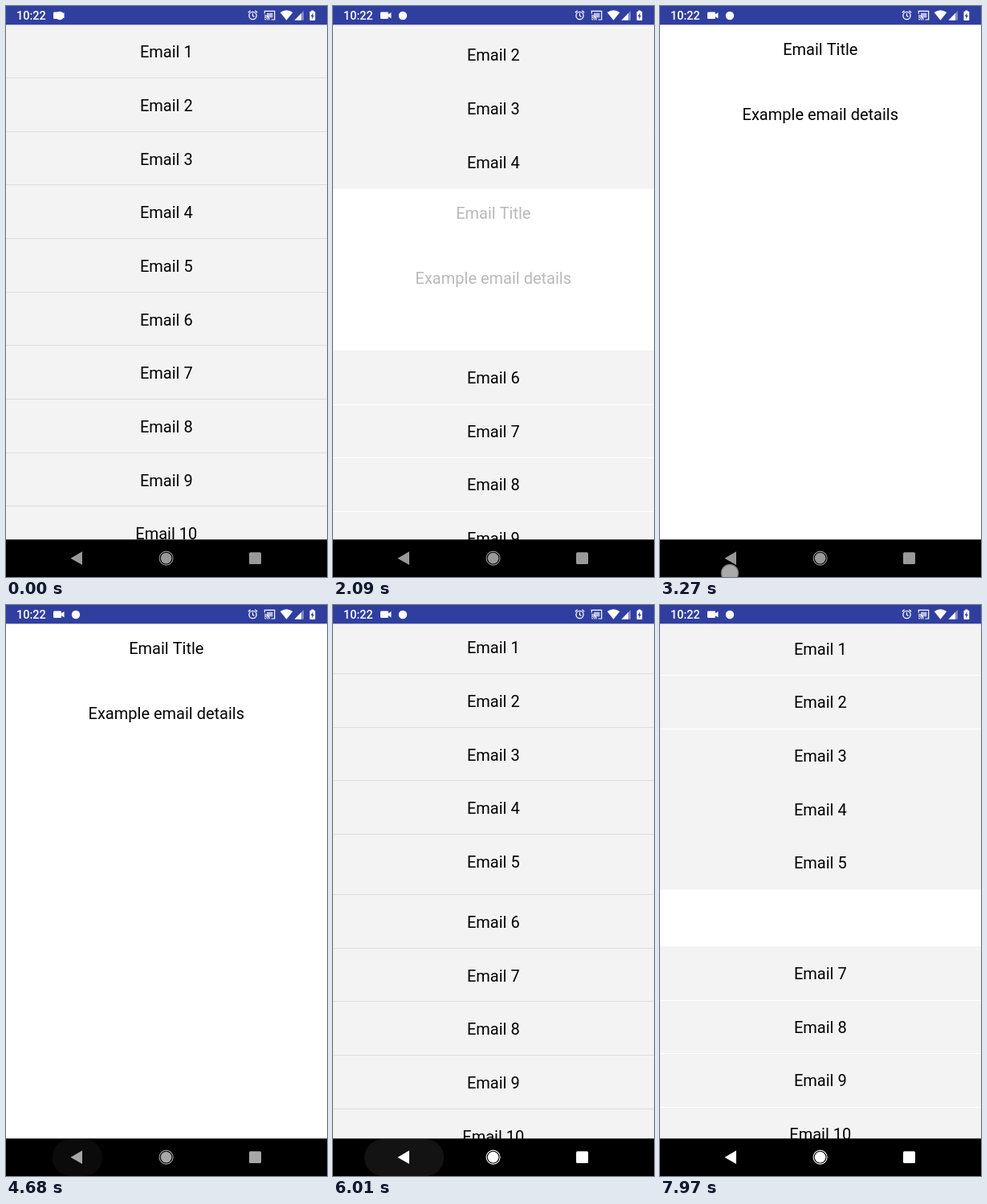
An HTML page with a canvas for the animation above (8000 ms loop, 400 px wide and 711 px high).

```html
<!DOCTYPE html>
<html lang="en">
<head>
<meta charset="utf-8">
<title>Expanding email list</title>
<style>
  html, body { margin: 0; width: 100%; height: 100%; overflow: hidden; background: #fff; }
  canvas { display: block; }
</style>
</head>
<body>
<canvas id="stage" width="400" height="711"></canvas>
<script>
const ctx = document.getElementById('stage').getContext('2d');
const LOOP = 8000, DURATION = 1540;
const OPEN = 1707, CLOSE = 4715, REOPEN = 7882;
const TOP = 23.33, BOTTOM = 664.33, ROW = 66.65;
const ROW_COLOR = '#f3f3f3';

const clamp = v => Math.min(1, Math.max(0, v));
const mix = (a, b, k) => a + (b - a) * k;
const ramp = (t, from, to) => clamp((t - from) / (to - from));

// Cubic bezier (0.4, 0, 0.2, 1), solved by bisection
function ease(x) {
  if (x <= 0 || x >= 1) return clamp(x);
  let lo = 0, hi = 1, s;
  for (let i = 0; i < 24; i++) {
    s = (lo + hi) / 2;
    const r = 1 - s;
    if (1.2 * s * r * r + 0.6 * s * s * r + s * s * s < x) lo = s; else hi = s;
  }
  return s * s * (3 - 2 * s);
}

function expansion(t) {
  if (t < CLOSE) return ease((t - OPEN) / DURATION);
  if (t < REOPEN) return 1 - ease((t - CLOSE) / DURATION);
  return ease((t - REOPEN) / DURATION);
}

function rect(x, y, w, h, color) {
  ctx.fillStyle = color;
  ctx.fillRect(x, y, w, h);
}

function roundRect(x, y, w, h, r, color) {
  ctx.fillStyle = color;
  ctx.beginPath();
  ctx.roundRect(x, y, w, h, r);
  ctx.fill();
}

function poly(points, color) {
  ctx.fillStyle = color;
  ctx.beginPath();
  for (let i = 0; i < points.length; i += 2) ctx.lineTo(points[i], points[i + 1]);
  ctx.closePath();
  ctx.fill();
}

function disc(x, y, r, color) {
  ctx.fillStyle = color;
  ctx.beginPath();
  ctx.arc(x, y, r, 0, 7);
  ctx.fill();
}

function arc(x, y, r, width, color, from = 0, to = 2 * Math.PI) {
  ctx.strokeStyle = color;
  ctx.lineWidth = width;
  ctx.beginPath();
  ctx.arc(x, y, r, from, to);
  ctx.stroke();
}

function label(text, y) {
  ctx.font = '400 20px Roboto, sans-serif';
  ctx.textAlign = 'center';
  ctx.fillStyle = '#000';
  ctx.fillText(text, 199.8, y);
}

function touch(x, y, fill, edge) {
  disc(x, y, 10.5, fill);
  arc(x, y, 10.5, 1.5, edge);
}

function press(y, height, x, radius) {
  ctx.save();
  ctx.beginPath();
  ctx.rect(0, y, 400, height);
  ctx.clip();
  disc(x, y + 39, radius, '#e9e9e9');
  ctx.restore();
}

function drawList(t) {
  const p = expansion(t);
  const active = t < 7000 ? 5 : 6;
  const expanding = (t >= OPEN && t < CLOSE) || t >= REOPEN;
  const start = TOP + ROW * (active - 1);
  const gapTop = mix(start, TOP, p);
  const gapBottom = mix(start + ROW, BOTTOM, p);

  ctx.save();
  ctx.beginPath();
  ctx.rect(0, 23, 400, 642);
  ctx.clip();
  rect(0, 23, 400, 642, expanding ? '#fff' : ROW_COLOR);

  for (let i = 1; i <= 11; i++) {
    const isActive = i === active;
    if (isActive && expanding) continue;
    const y = i <= active ? gapTop - (active - i) * ROW : gapBottom + (i - active - 1) * ROW;
    const height = isActive ? gapBottom - gapTop : ROW;
    rect(0, y, 400, height + 0.5, ROW_COLOR);
    if (isActive) {
      const pressed = active === 5 ? 1610 : 7400;
      if (t >= pressed && p === 0) press(y, height, 266, 62 + t - pressed);
    }
    label('Email ' + i, y + 41);
  }

  for (let i = 1; i <= 10; i++) {
    const y = i < active ? gapTop - (active - 1 - i) * ROW : gapBottom + (i - active) * ROW;
    if (expanding) {
      if (i < active - 3 || i > active) rect(0, Math.round(y), 400, 1, '#fff');
    } else {
      const nearGap = i === active || i === active - 1;
      ctx.globalAlpha = nearGap ? 1 - ramp(p, 0.05, 0.3) : 1;
      rect(0, Math.round(y) - 1, 400, 1, '#dedede');
      ctx.globalAlpha = 1;
    }
  }

  // Opened email, cross-fading with its row
  const fade = expanding ? ramp(p, 0.04, 0.75) : ramp(p, 0.45, 1);
  if (fade > 0) {
    ctx.beginPath();
    ctx.rect(0, gapTop, 400, gapBottom - gapTop);
    ctx.clip();
    ctx.globalAlpha = fade;
    rect(0, gapTop, 400, gapBottom - gapTop, '#fff');
    label('Email Title', gapTop + 37.6);
    label('Example email details', gapTop + 118.4);
  }
  ctx.restore();

  if (t >= 1610 && t < OPEN) touch(267, 329, '#f4f4f4', '#e0e0e0');
  if (t >= 7400 && t < 7800) touch(267, 395, '#f4f4f4', '#e0e0e0');
}

function drawStatus(t) {
  const white = '#fff';
  rect(0, 0, 400, TOP, '#303f9f');
  ctx.font = '500 14.5px Roboto, sans-serif';
  ctx.textAlign = 'left';
  ctx.fillStyle = white;
  ctx.fillText('10:22', 13, 17);

  // Camera and the notification dot sliding out from behind it
  roundRect(59, 7.5, 10, 8.5, 1.2, white);
  poly([68, 11, 72.5, 8, 72.5, 15.5, 68, 12.5], white);
  disc(mix(67, 87, ease(ramp(t, 30, 860))), 12, 5.2, white);

  // Alarm
  arc(307.5, 12, 4.6, 1.3, white);
  ctx.lineWidth = 1.2;
  ctx.beginPath();
  ctx.moveTo(307.5, 9); ctx.lineTo(307.5, 12.3); ctx.lineTo(309.5, 13.6);
  ctx.moveTo(301.8, 8.2); ctx.lineTo(304.6, 5.8);
  ctx.moveTo(313.2, 8.2); ctx.lineTo(310.4, 5.8);
  ctx.stroke();

  // Screen cast
  ctx.beginPath();
  ctx.moveTo(322.3, 9.5); ctx.lineTo(322.3, 6.4); ctx.lineTo(334.7, 6.4);
  ctx.lineTo(334.7, 17); ctx.lineTo(330.5, 17);
  ctx.stroke();
  roundRect(325, 8.7, 7.4, 5.8, 0, 'rgba(255,255,255,.65)');
  for (const r of [1.5, 3.8, 6]) arc(322, 17.5, r, 1.2, white, -Math.PI / 2, 0);

  // Wi-Fi
  ctx.fillStyle = white;
  ctx.beginPath();
  ctx.moveTo(349.5, 17.7);
  ctx.lineTo(341.7, 8);
  ctx.quadraticCurveTo(349.5, 2.5, 357.3, 8);
  ctx.fill();

  // Signal and battery
  poly([359.5, 17.7, 371, 6, 371, 17.7], 'rgba(255,255,255,.4)');
  poly([359.5, 17.7, 368, 9, 368, 17.7], white);
  rect(380.4, 5.5, 3, 2, white);
  roundRect(378.5, 6.7, 6.8, 11.3, 0.8, white);
  poly([382.6, 8.3, 379.8, 13, 381.5, 13, 381.2, 16.5, 384, 11.8, 382.3, 11.8], '#303f9f');
}

function drawNav(t) {
  rect(0, BOTTOM, 400, 711 - BOTTOM, '#000');
  const glow = ramp(t, 4560, 4900) * (1 - 0.4 * ramp(t, 5350, 6010)) * (1 - ramp(t, 6010, 6160));
  if (glow > 0) {
    const half = mix(30, 49.5, ease(ramp(t, 4500, 5700)));
    roundRect(88.7 - half, 665, half * 2, 46, 23, `rgba(255,255,255,${0.125 * glow})`);
  }
  const v = Math.round(mix(153, 255, ramp(t, 4530, 5600)));
  const color = `rgb(${v},${v},${v})`;
  poly([80.5, 687.7, 95, 679.3, 95, 696], color);
  disc(199.6, 687.6, 6.8, color);
  arc(199.6, 687.6, 8.5, 1.1, color);
  roundRect(303, 680.3, 15, 14.8, 1.5, color);
  if (t >= 3270 && t < 4590) touch(87, 706, 'rgba(200,200,200,.85)', 'rgba(130,130,130,.8)');
}

function frame() {
  const t = performance.now() % LOOP;
  drawList(t);
  drawStatus(t);
  drawNav(t);
  requestAnimationFrame(frame);
}
frame();
</script>
</body>
</html>
```
